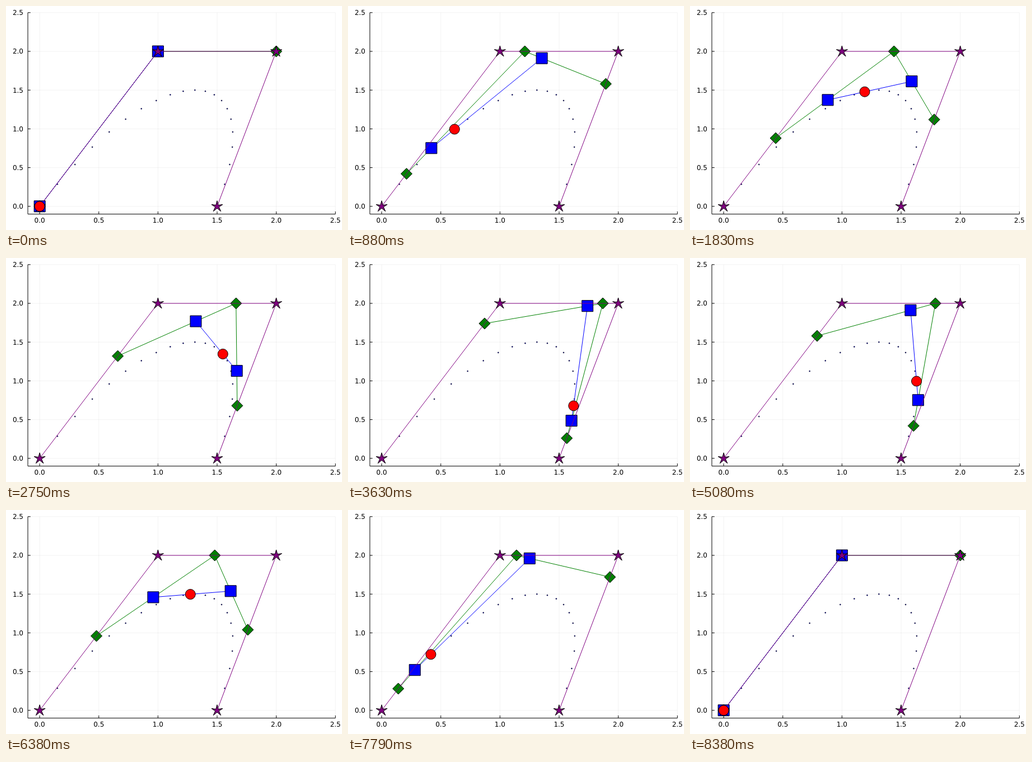
These frames come from a looping animation (600 by 400 pixels, 8.43 s). An HTML page:

```html
<!DOCTYPE html>
<html lang="en">
<head>
<meta charset="utf-8">
<title>Cubic curve construction</title>
<style>
  html, body { margin: 0; width: 100%; height: 100%; overflow: hidden; background: #fff; }
  svg { display: block; width: 600px; height: 400px; }
  text { font: 12px "DejaVu Sans", sans-serif; fill: #000; }
</style>
</head>
<body>
<svg id="plot" viewBox="0 0 600 400"></svg>
<script>
const LOOP = 8430, FPS = 24, STEPS = 100;
const BOX = { left: 39.03, right: 588.19, top: 11.81, bottom: 371.61 };
const MIN = -0.1, MAX = 2.5;
const CONTROL = [[0, 0], [1, 2], [2, 2], [1.5, 0]];
const SHAPES = {
  star: "M0-10L2.2-2.2L10-3.3L3.3 1.1L6.7 8.9L0 3.3L-6.7 8.9L-3.3 1.1L-10-3.3L-2.2-2.2Z",
  diamond: "M0-10L10 0L0 10L-10 0Z",
  square: "M-10-10H10V10H-10Z",
  circle: "M-9 0A9 9 0 1 1 9 0A9 9 0 1 1-9 0Z"
};

const svg = document.getElementById("plot");
const px = x => BOX.left + (x - MIN) / (MAX - MIN) * (BOX.right - BOX.left);
const py = y => BOX.bottom - (y - MIN) / (MAX - MIN) * (BOX.bottom - BOX.top);
const toPixels = ([x, y]) => [px(x), py(y)];

function add(tag, attrs) {
  const el = document.createElementNS("http://www.w3.org/2000/svg", tag);
  for (const name in attrs) el.setAttribute(name, attrs[name]);
  return svg.appendChild(el);
}

function label(x, y, anchor, value) {
  add("text", { x, y, "text-anchor": anchor }).textContent = value.toFixed(1);
}

// One round of linear interpolation between neighbouring points
const reduce = (points, t) => points.slice(1).map((b, i) =>
  b.map((v, axis) => points[i][axis] + (v - points[i][axis]) * t));

function drawAxes() {
  const { left, right, top, bottom } = BOX;
  let grid = "", ticks = `M${left} ${top}V${bottom}H${right}`;
  for (let v = 0; v <= MAX; v += 0.5) {
    const x = px(v), y = py(v);
    grid += `M${x} ${top}V${bottom}M${left} ${y}H${right}`;
    ticks += `M${x} ${bottom}v-4.72M${left} ${y}h4.72`;
    label(x, 387.2, "middle", v);
    label(31, y + 4.4, "end", v);
  }
  add("path", { d: grid, fill: "none", stroke: "#000", "stroke-opacity": 0.1, "stroke-width": 0.5 });
  add("path", { d: ticks, fill: "none", stroke: "#000" });
}

function drawDots() {
  for (let i = 0; i <= 20; i++) {
    let points = CONTROL;
    while (points.length > 1) points = reduce(points, i / 20);
    const [cx, cy] = toPixels(points[0]);
    add("circle", { cx, cy, r: 0.9, fill: "blue", stroke: "#000", "stroke-width": 0.8 });
  }
}

function makeLayer(color, shape, count) {
  const line = add("polyline", { fill: "none", stroke: color });
  const marks = Array.from({ length: count }, () =>
    add("path", { d: SHAPES[shape], fill: color, stroke: "#000" }));
  return points => {
    const spots = points.map(toPixels);
    line.setAttribute("points", spots.join(" "));
    marks.forEach((mark, i) => mark.setAttribute("transform", `translate(${spots[i]})`));
  };
}

drawAxes();
drawDots();
const showMids = makeLayer("green", "diamond", 3);
const showInner = makeLayer("blue", "square", 2);
const showControl = makeLayer("purple", "star", 4);
const showPoint = makeLayer("red", "circle", 1);
showControl(CONTROL);

// Step starts are rounded to hundredths of a second
function stepAt(ms) {
  const cs = Math.floor(ms / 10);
  return Math.ceil((2 * cs + 1) * FPS / 200) - 1;
}

function draw() {
  const step = Math.min(stepAt(performance.now() % LOOP), 2 * STEPS + 1);
  const t = Math.min(step, 2 * STEPS + 1 - step) / STEPS;
  const mids = reduce(CONTROL, t), inner = reduce(mids, t);
  showMids(mids);
  showInner(inner);
  showPoint(reduce(inner, t));
  requestAnimationFrame(draw);
}
draw();
</script>
</body>
</html>
```
